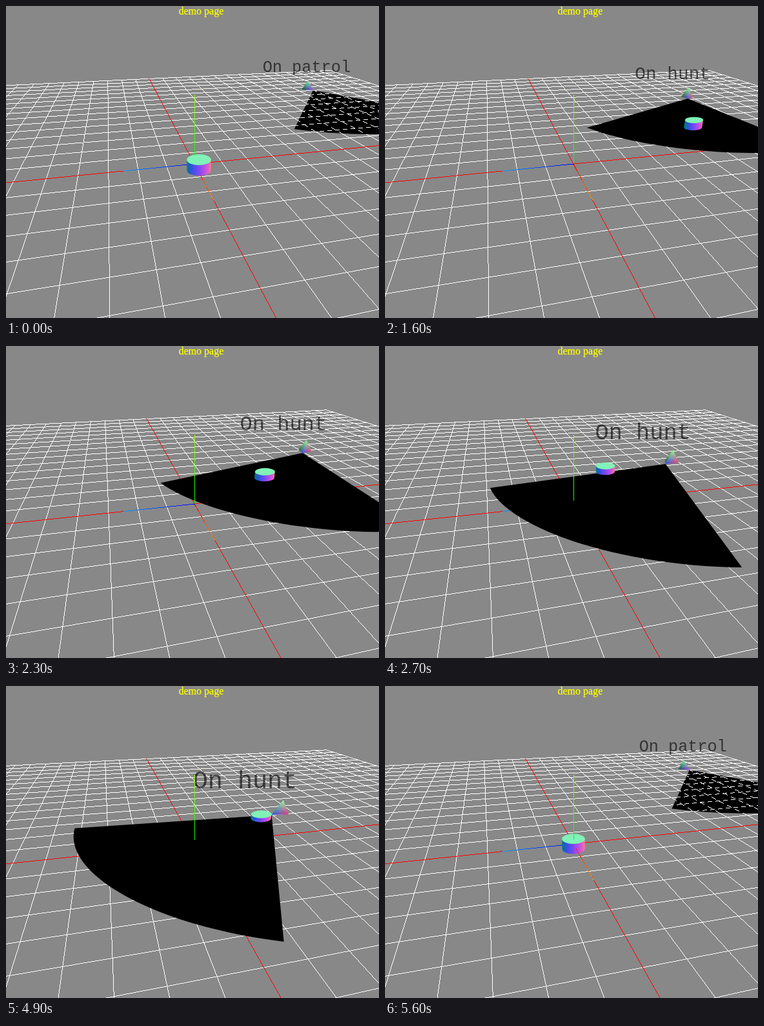
These frames come from a looping animation (578 by 482 pixels, 6.9 s). An HTML page with a canvas:

```html
<!DOCTYPE html>
<html lang="en">
<head>
<meta charset="utf-8">
<title>demo page</title>
<style>
  html, body { margin: 0; width: 100%; height: 100%; overflow: hidden; background: #888; }
  canvas { display: block; position: absolute; left: 0; top: 0; }
  h1 {
    position: absolute; left: 267.5px; top: -1px; margin: 0; white-space: nowrap;
    font: 16px/18px "Liberation Serif", serif; color: #ff0; -webkit-text-stroke: 0.25px #ff0;
  }
</style>
</head>
<body>
<canvas id="stage" width="578" height="482"></canvas>
<h1>demo page</h1>
<script>
const W = 578, H = 482, LOOP = 6900, STEP = 100;
const FOCAL = 530, DIST = 245, CX = 292, CY = 244;
const GRID = 300, CELL = 20, AXIS = 50;
const RADIUS = 160, HALF_ANGLE = 34.2, REACH = 20;
const CYL_R = 8.2;
const rad = deg => deg * Math.PI / 180;
const mix = (a, b, k) => a.map((v, i) => v + (b[i] - v) * k);

// [time, x, z, heading, height, upward slope]
const HOME = [-200, -200, 2, 0, 0], PAUSE = [-47.7, -93.8, 55.5, 2.9, 0.0045];
const hunterKeys = [
  [0, ...HOME], [700, ...HOME],
  [800, -200, -200, 27.5, 0, 0],
  [1600, -157.8, -179.6, 28.5, 1.2, 0.006],
  [2300, -101.3, -146.4, 38.3, 2.2, 0.007],
  [3000, ...PAUSE], [4800, ...PAUSE],
  [4900, -45.4, -92.8, 57.6, 2.5, 0.013],
  [5500, -30.7, -69, 57.6, 2.6, 0.013],
  [5600, ...HOME], [LOOP, ...HOME]
];
// [time, x, z, visible bottom, top]
const START = [10.6, -0.7, 0, 8], AWAY = [-66, -21, 0, 8];
const BAIT = [-24.6, -61.6, 4.5, 8], ORIGIN = [0, 0, -4, 4];
const preyKeys = [
  [0, ...START], [700, ...START],
  [800, -48.4, -123, 0, 8],
  [1900, -48.4, -123, 1.5, 8],
  [2300, -29.5, -67, 2.8, 8],
  [2900, -61, -27.6, 3, 8],
  [3000, ...AWAY], [4800, ...AWAY],
  [4900, ...BAIT], [5500, ...BAIT],
  [5600, ...ORIGIN], [LOOP, ...ORIGIN]
];

function track(keys, t) {
  const i = keys.findIndex(k => k[0] > t), a = keys[i - 1], b = keys[i];
  return mix(a, b, (t - a[0]) / (b[0] - a[0])).slice(1);
}

function makeCamera(azimuth, elevation) {
  const sa = Math.sin(rad(azimuth)), ca = Math.cos(rad(azimuth));
  const se = Math.sin(rad(elevation)), ce = Math.cos(rad(elevation));
  const view = ([x, y, z]) => {
    const s = x * ca + z * sa;
    return [x * sa - z * ca, y * ce - s * se, s * ce + y * se];
  };
  const project = p => {
    const [r, u, n] = view(p), d = DIST - n;
    return [CX + FOCAL * r / d, CY - FOCAL * u / d, d / DIST];
  };
  return { view, project, se, ce };
}

// One-pixel line without smoothing
function pixelLine(c, p, q, dashed) {
  const dx = q[0] - p[0], dy = q[1] - p[1];
  const n = Math.max(1, Math.ceil(Math.max(Math.abs(dx), Math.abs(dy))));
  for (let i = 0; i <= n; i++) {
    if (dashed && i % 12 > 6) continue;
    const x = Math.floor(p[0] + dx * i / n), y = Math.floor(p[1] + dy * i / n);
    if (x >= 0 && x < W && y >= 0 && y < H) c.fillRect(x, y, 1, 1);
  }
}

function segment(c, cam, a, b, dashed) {
  const near = 0.15, da = cam.project(a)[2], db = cam.project(b)[2];
  if (da < near && db < near) return;
  const cut = mix(a, b, (near - da) / (db - da || 1));
  pixelLine(c, cam.project(da < near ? cut : a), cam.project(db < near ? cut : b), dashed);
}

function drawGrid(c, cam, dashed) {
  c.fillStyle = '#fff';
  for (let v = -GRID; v <= GRID; v += CELL) {
    if (!v) continue;
    segment(c, cam, [-GRID, 0, v], [GRID, 0, v], dashed);
    segment(c, cam, [v, 0, -GRID], [v, 0, GRID], dashed);
  }
  c.fillStyle = '#f00';
  segment(c, cam, [-GRID, 0, 0], [GRID, 0, 0], dashed);
  segment(c, cam, [0, 0, -GRID], [0, 0, GRID], dashed);
}

function drawAxis(c, cam, dir, from, start, end) {
  const at = k => cam.project(dir.map(v => v * k));
  const o = at(0), tip = at(AXIS);
  const g = c.createLinearGradient(o[0], o[1], tip[0], tip[1]);
  g.addColorStop(0, start);
  g.addColorStop(1, end);
  c.fillStyle = g;
  pixelLine(c, at(from), tip);
}
const axisX = (c, cam, from) => drawAxis(c, cam, [1, 0, 0], from, '#f00', '#f90');
const axisY = (c, cam, from) => drawAxis(c, cam, [0, 1, 0], from, '#0f0', '#9f0');
const axisZ = (c, cam, from) => drawAxis(c, cam, [0, 0, 1], from, '#00f', '#09f');

function floorLayer(cam) {
  const layer = document.createElement('canvas');
  layer.width = W;
  layer.height = H;
  const c = layer.getContext('2d');
  c.fillStyle = '#888';
  c.fillRect(0, 0, W, H);
  drawGrid(c, cam);
  axisX(c, cam, 0);
  axisY(c, cam, 0);
  axisZ(c, cam, 0);
  return layer;
}

const cameras = [makeCamera(12.95, 25.6), makeCamera(13.69, 25.6)];
const floors = cameras.map(floorLayer);
const ctx = document.getElementById('stage').getContext('2d');

// Colour of a surface whose normal, seen from the camera, is n
const tint = n => {
  const len = Math.hypot(...n);
  return n.map(v => 127.5 + 127.5 * v / len);
};
const rgb = c => `rgb(${c.map(Math.round)})`;

function polygon(points) {
  ctx.beginPath();
  points.forEach(p => ctx.lineTo(p[0], p[1]));
  ctx.closePath();
}

// Triangle with colours blended between its corners
function shadedTriangle(pts, cols, n = 6) {
  const blend = (set, i, j) => set[0].map((v, k) =>
    v + (set[1][k] - v) * i / n + (set[2][k] - v) * j / n);
  const cell = (...ij) => {
    polygon(ij.map(([i, j]) => blend(pts, i, j)));
    const mid = [0, 1].map(k => (ij[0][k] + ij[1][k] + ij[2][k]) / 3);
    ctx.fillStyle = ctx.strokeStyle = rgb(blend(cols, ...mid));
    ctx.lineWidth = 0.5;
    ctx.fill();
    ctx.stroke();
  };
  for (let i = 0; i < n; i++) {
    for (let j = 0; i + j < n; j++) {
      cell([i, j], [i + 1, j], [i, j + 1]);
      if (i + j < n - 1) cell([i + 1, j], [i + 1, j + 1], [i, j + 1]);
    }
  }
}

const facesCamera = ([a, b, c]) =>
  (b[0] - a[0]) * (c[1] - a[1]) - (b[1] - a[1]) * (c[0] - a[0]) < 0;

// Three-sided pyramid whose corner normals point away from its middle
function drawHunter(cam, [x, z, heading, h]) {
  const c = Math.cos(rad(heading)), s = Math.sin(rad(heading)), size = 7.5;
  const corner = (point, normal) => ({ at: cam.project(point), color: tint(cam.view(normal)) });
  const tip = corner([x + REACH * c, h, z + REACH * s], [c, 0, s]);
  const base = [90, 210, 330].map(deg => {
    const side = Math.cos(rad(deg)), up = Math.sin(rad(deg));
    return corner(
      [x + 3 * c - s * side * size, h + 1.5 + up * size, z + 3 * s + c * side * size],
      [-s * side - c / 3, up, c * side - s / 3]);
  });
  const faces = [base, ...base.map((b, i) => [base[(i + 1) % 3], b, tip])];
  for (const face of faces) {
    const pts = face.map(v => v.at);
    if (facesCamera(pts)) shadedTriangle(pts, face.map(v => v.color));
  }
}

function drawPrey(cam, [x, z, bottom, top]) {
  const a = cam.project([x, top, z]), b = cam.project([x, bottom, z]);
  const radius = p => CYL_R * FOCAL / DIST / p[2];
  const ra = radius(a), rb = radius(b), flat = cam.se / a[2];
  const g = ctx.createLinearGradient(a[0] - ra, 0, a[0] + ra, 0);
  for (let i = 0; i <= 10; i++) {
    const k = i / 5 - 1, q = Math.sqrt(Math.max(0, 1 - k * k));
    g.addColorStop(i / 10, rgb(tint([k, -q * cam.se, q * cam.ce])));
  }
  ctx.fillStyle = g;
  ctx.beginPath();
  ctx.ellipse(b[0], b[1], rb, rb * flat, 0, 0, Math.PI);
  ctx.lineTo(a[0] - ra, a[1]);
  ctx.lineTo(a[0] + ra, a[1]);
  ctx.fill();
  ctx.fillStyle = rgb(tint([0, cam.ce, cam.se]));
  ctx.beginPath();
  ctx.ellipse(a[0], a[1], ra, ra * flat, 0, 0, 2 * Math.PI);
  ctx.fill();
}

function drawSight(cam, [x, z, heading, h, slope]) {
  const ax = x + REACH * Math.cos(rad(heading)), az = z + REACH * Math.sin(rad(heading));
  const points = [cam.project([ax, h, az])];
  for (let i = 0; i <= 32; i++) {
    const off = rad(HALF_ANGLE * (i / 16 - 1)), ang = rad(heading) + off;
    const y = h + slope * RADIUS * Math.cos(off);
    points.push(cam.project([ax + RADIUS * Math.cos(ang), y, az + RADIUS * Math.sin(ang)]));
  }
  polygon(points);
  ctx.fillStyle = '#000';
  ctx.fill();
  if (h < 0.1) {
    ctx.save();
    ctx.clip();
    drawGrid(ctx, cam, true);
    ctx.restore();
  }
}

function drawLabel(cam, [x, z, heading, h], hunting) {
  const [px, py, d] = cam.project([x, h, z]);
  const size = 47.6 / d;
  const dx = hunting ? -135 - 1.22 * (heading - 27.5) : -123 - 0.505 * (heading - 2);
  ctx.font = `${size}px "Liberation Mono", monospace`;
  ctx.fillStyle = 'rgba(0,0,0,.62)';
  ctx.fillText(hunting ? 'On hunt' : 'On patrol', px + dx / d - size * 0.06, py + (hunting ? -40 : -44) / d);
}

function render(t) {
  const late = t >= 1900 ? 1 : 0, cam = cameras[late];
  const hunter = track(hunterKeys, t), prey = track(preyKeys, t);
  const hunting = (t >= 800 && t < 3000) || (t >= 4900 && t < 5600);
  ctx.drawImage(floors[late], 0, 0);
  drawSight(cam, hunter);
  const preyFirst = cam.project([prey[0], 0, prey[1]])[2] > cam.project([hunter[0], 0, hunter[1]])[2];
  if (preyFirst) drawPrey(cam, prey);
  drawHunter(cam, hunter);
  if (!preyFirst) drawPrey(cam, prey);
  drawLabel(cam, hunter, hunting);
  const atOrigin = t >= 5600;
  axisY(ctx, cam, atOrigin ? 4 : t < 800 ? 7 : hunter[3] + 80 * hunter[4]);
  if (atOrigin) axisX(ctx, cam, 8);
}

let shown = -1;
const begin = performance.now();
function frame() {
  const t = Math.floor((performance.now() - begin) % LOOP / STEP) * STEP;
  if (t !== shown) render(shown = t);
  requestAnimationFrame(frame);
}
frame();
</script>
</body>
</html>
```
